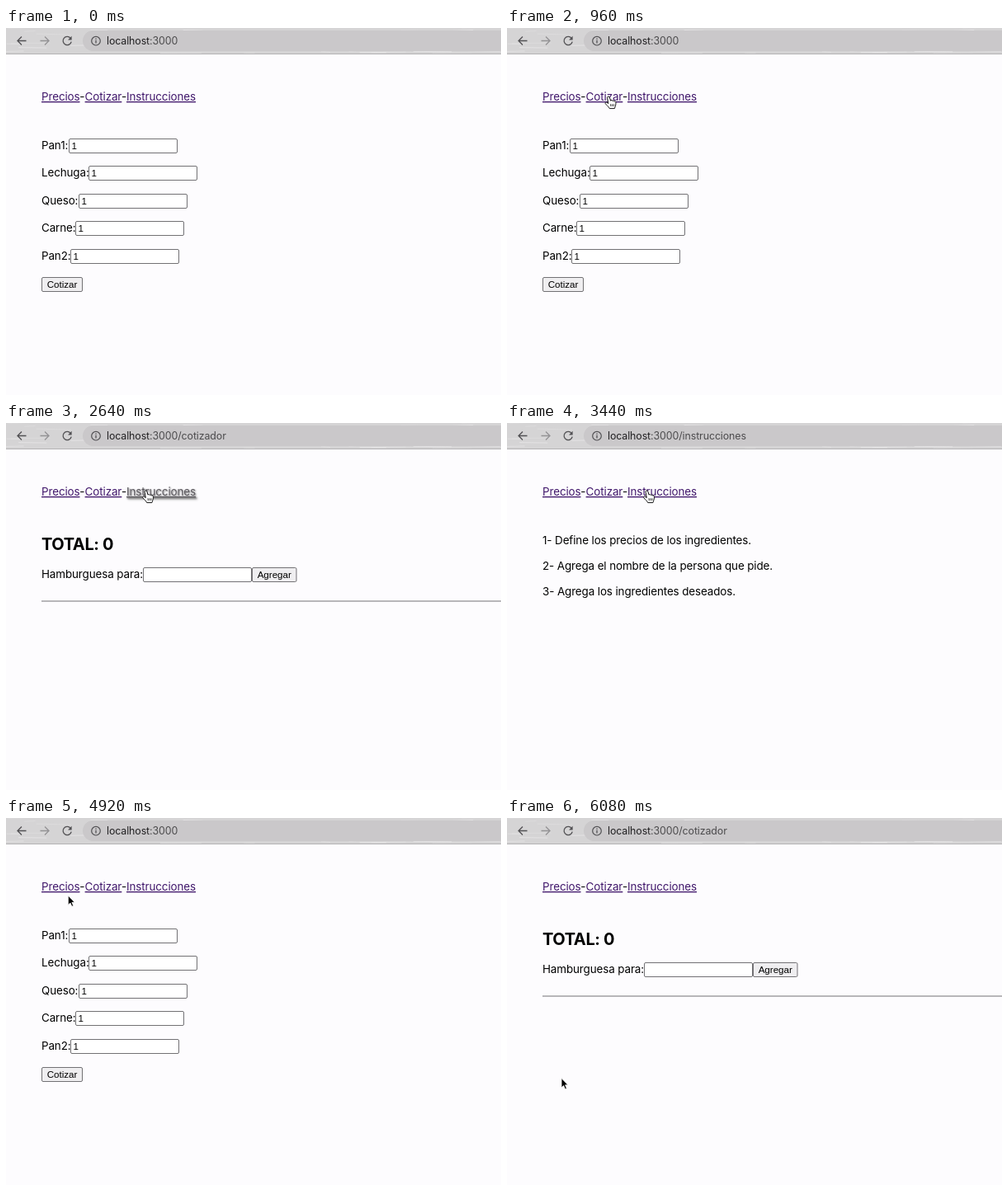
Recreate the animation shown at these times as an HTML page. Size 600 px wide and 445 px high, loop 6.72 s.

```html
<!DOCTYPE html>
<html lang="es">
<head>
<meta charset="utf-8">
<title>Cotizador</title>
<style>
  html, body { margin: 0; width: 100%; height: 100%; overflow: hidden; background: #fdfcfe; }
  svg { display: block; }
  text { font: 13.4px Inter, sans-serif; letter-spacing: -.1px; fill: #000; white-space: pre; }
  .url { font-size: 12.4px; letter-spacing: -.1px; fill: #4c4b4d; }
  .host { fill: #222123; }
  .link { fill: #40176b; text-decoration: underline; }
  .link.down { fill: #5c595f; text-shadow: 1px 1px 2px #777; }
  .title { font-size: 20px; font-weight: 700; letter-spacing: -.4px; }
  .ui { font: 11.6px "Liberation Sans", Arial, sans-serif; letter-spacing: 0; }
  .mid { text-anchor: middle; }
  .field { fill: #fff; stroke: #727174; }
  .button { fill: #efeef0; stroke: #727174; }
  .button.down { fill: #dcdbdd; }
  .icon { fill: none; stroke: #525154; stroke-width: 1.3; }
</style>
</head>
<body>
<svg width="600" height="445" viewBox="0 0 600 445">
  <rect width="600" height="445" fill="#fdfcfe"/>
  <rect width="600" height="31" fill="#d5d4d5"/>
  <g id="grain" stroke="#f0eff0"></g>
  <rect y="31" width="600" height="1" fill="#b3b2b4"/>
  <rect x="93" y="3" width="530" height="25" rx="12.5" fill="#cac8ca"/>
  <g class="icon">
    <path d="M24.5 15.5H14M19 10.5l-5 5 5 5"/>
    <path d="M41.5 15.5H52M47 10.5l5 5-5 5" stroke="#949395"/>
    <path d="M78.2 12.3A5.1 5.1 0 1 0 79.2 16.6"/>
    <path d="M79.6 9.8v4.6H75z" fill="#525154" stroke="none"/>
    <circle cx="109" cy="15.7" r="5.3" stroke-width="1.2"/>
    <path d="M109 14.8v3.8M109 12.4v1.3"/>
  </g>
  <text class="url" x="122" y="20"><tspan class="host">localhost</tspan>:3000<tspan id="path"></tspan></text>
  <g id="nav"></g>
  <g id="prices"></g>
  <g id="quote">
    <text class="title" x="43" y="153.7">TOTAL: 0</text>
    <path d="M43 216h557" stroke="#a09fa2" stroke-width="1.4"/>
  </g>
  <g id="help"></g>
  <g id="cursor" stroke-linejoin="round">
    <path id="arrow" d="M0 0V11.4L2.6 9 4.5 13.2 6.4 12.4 4.6 8.3H8Z" stroke="#fff" stroke-width=".8"/>
    <g id="hand" stroke="#151515">
      <path fill="#fff" d="M-1.5 1.2C-1.2-.4 .9-.4 1.3 1L2.6 5.2C3.2 4.2 4.8 4.4 5 5.6 5.6 4.8 7 5 7.2 6.2 8 5.6 9 6.2 9 7.4L8.8 10C8.8 11.8 7.6 12.6 7.4 14.6H1.2C.6 12.6-2.2 10.8-3.8 8.6-4.4 7.4-3 6.6-1.8 7.4L-.2 8.6Z"/>
      <path d="M2.4 9.2l.4 2.8M4.4 9.2l.2 2.8M6.4 9.2v2.8" stroke-width=".8"/>
    </g>
  </g>
</svg>
<script>
const $ = id => document.getElementById(id);

function add(parent, tag, attrs, text = '') {
  const el = document.createElementNS('http://www.w3.org/2000/svg', tag);
  for (const key in attrs) el.setAttribute(key, attrs[key]);
  el.textContent = text;
  return $(parent).appendChild(el);
}
const label = (parent, x, y, text, cls = '') => add(parent, 'text', { x, y, class: cls }, text);
const box = (parent, x, y, width, cls) =>
  add(parent, 'rect', { x: x + .5, y: y + .5, width: width - 1, height: 17, rx: 1.5, class: cls });

function button(parent, x, y, width, text) {
  const el = box(parent, x, y, width, 'button');
  label(parent, x + width / 2, y + 13, text, 'ui mid');
  return el;
}

// Faint horizontal streaks in the toolbar
let seed = 7;
const random = () => (seed = seed * 16807 % 2147483647) / 2147483647;
for (let i = 0; i < 70; i++) {
  const x = random() * 600, y = random() * 31;
  add('grain', 'path', { d: `M${x} ${y}l${10 + random() * 40} ${random() * 2 - 1}`, opacity: .2 + random() * .4 });
}

const precios = label('nav', 43, 88, 'Precios', 'link');
label('nav', 89.3, 88, '-');
const cotizar = label('nav', 95.6, 88, 'Cotizar', 'link');
label('nav', 140, 88, '-');
const instrucciones = label('nav', 146, 88, 'Instrucciones', 'link');

[['Pan1:', 76], ['Lechuga:', 100], ['Queso:', 88], ['Carne:', 84], ['Pan2:', 78]].forEach(([name, x], i) => {
  const y = Math.floor(134 + i * 33.6);
  label('prices', 43, y + 13, name);
  box('prices', x, y, 132, 'field');
  label('prices', x + 3.5, y + 13, '1', 'ui');
});
const submit = button('prices', 43, 302, 50, 'Cotizar');

label('quote', 43, 188, 'Hamburguesa para:');
box('quote', 166, 175, 132, 'field');
button('quote', 298, 175, 54.5, 'Agregar');

['1- Define los precios de los ingredientes.',
 '2- Agrega el nombre de la persona que pide.',
 '3- Agrega los ingredientes deseados.'].forEach((line, i) => label('help', 43, 147 + i * 31, line));

const LOOP = 6720, TICK = 40;
const paths = { prices: '', quote: '/cotizador', help: '/instrucciones' };
// Start time and page
const visits = [[0, 'prices'], [1320, 'quote'], [2760, 'help'], [4160, 'prices'], [6000, 'quote']];
// Pressed element, from, to
const presses = [[cotizar, 1280, 1320], [instrucciones, 2640, 2760], [precios, 4120, 4160], [submit, 5960, 6000]];
// Time, x, y of the pointer
const track = [
  [40, 529, 152], [400, 270, 70], [680, 206, 84], [960, 123, 83], [1920, 123, 83],
  [2320, 169.5, 82], [3440, 169.5, 82], [3800, 76.5, 84.7], [3960, 75, 85.5],
  [4880, 75, 85.5], [4920, 75.3, 94], [5560, 66, 315.5], [LOOP, 66, 315.5]
];

function pointerAt(t) {
  const i = Math.max(1, track.findIndex(key => key[0] > t));
  const [t0, x0, y0] = track[i - 1], [t1, x1, y1] = track[i];
  const u = Math.max(0, (t - t0) / (t1 - t0)), ease = u * (2 - u);
  return [x0 + (x1 - x0) * ease, y0 + (y1 - y0) * ease];
}

const show = (id, on) => $(id).style.display = on ? '' : 'none';

function draw(now) {
  const t = Math.floor(now % LOOP / TICK) * TICK;
  const page = visits.filter(v => v[0] <= t).pop()[1];
  for (const id in paths) show(id, id === page);
  $('path').textContent = paths[page];
  for (const [el, from, to] of presses) el.classList.toggle('down', t >= from && t < to);

  const [x, y] = pointerAt(t);
  const onLink = x > 43 && x < 230 && y > 75 && y < 93;
  show('cursor', t >= track[0][0]);
  show('hand', onLink);
  show('arrow', !onLink);
  $('cursor').setAttribute('transform', `translate(${x} ${y})`);
}

const start = performance.now();
function frame() {
  draw(performance.now() - start);
  requestAnimationFrame(frame);
}
frame();
</script>
</body>
</html>
```
